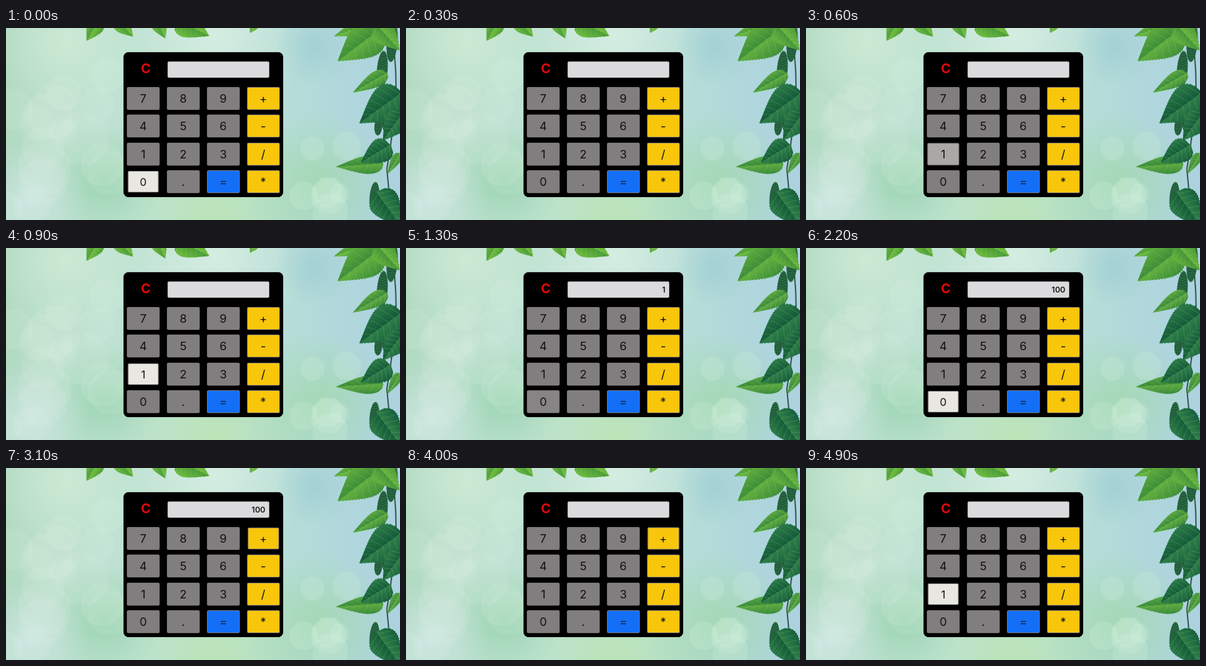
Write an HTML page with a canvas that moves like this. It is 600 by 293 pixels and loops after 5 s.

```html
<!DOCTYPE html>
<html lang="en">
<head>
<meta charset="utf-8">
<title>Calculator</title>
<style>
html, body { margin: 0; width: 100%; height: 100%; overflow: hidden; }
body { position: relative; font-family: Inter, Roboto, sans-serif; }
canvas { position: absolute; left: 0; top: 0; display: block; }
.calc { position: absolute; left: 179px; top: 37px; width: 243px; height: 221px; border-radius: 8px; background: #000; box-shadow: 0 0 1px #000; }
.clear { position: absolute; left: 20px; top: 12px; width: 28px; height: 26px; line-height: 26px; text-align: center; color: #e50909; font-size: 20px; font-weight: 700; }
.screen { position: absolute; left: 67px; top: 14px; width: 149px; height: 25px; padding-right: 6px; line-height: 25px; border-radius: 3px; background: #dbdbdd; box-shadow: inset 0 0 0 1px #b2b2b5; color: #151515; text-align: right; font-size: 12px; font-weight: 600; }
.key { position: absolute; box-sizing: border-box; width: 50px; height: 35px; line-height: 34px; border: 1px solid #767270; border-radius: 2px; text-align: center; font-size: 17.5px; color: #111; background: #817e7f; }
.op { background: #f8c60b; }
.eq { background: #146ff6; color: #10264c; }
</style>
</head>
<body>
<canvas id="scene" width="600" height="293"></canvas>
<div class="calc" id="calc">
  <div class="clear">C</div>
  <div class="screen" id="screen"></div>
</div>
<script>
const ctx = document.getElementById('scene').getContext('2d');
const clamp = x => Math.min(1, Math.max(0, x));
const mix = (a, b, k) => a + (b - a) * k;
const blend = (from, to, k) => `rgb(${from.map((v, i) => mix(v, to[i], k))})`;

let seed = 7;
function random(min, max) {
  seed = (seed * 16807) % 2147483647;
  return mix(min, max, seed / 2147483647);
}

function glow(x, y, r, rgb) {
  const g = ctx.createRadialGradient(x, y, 0, x, y, r);
  g.addColorStop(0, `rgba(${rgb},.8)`);
  g.addColorStop(0.5, `rgba(${rgb},.4)`);
  g.addColorStop(1, `rgba(${rgb},0)`);
  ctx.fillStyle = g;
  ctx.fillRect(0, 0, 600, 293);
}

function bokeh(x, y, r, alpha) {
  ctx.beginPath();
  for (let a = 0.4; a < 6.6; a += Math.PI / 4) {
    ctx.lineTo(x + r * Math.cos(a), y + r * Math.sin(a));
  }
  ctx.fillStyle = `rgba(228,246,236,${alpha})`;
  ctx.fill();
}

// Serrated leaf from base to tip; ratio is half width over length.
function leaf(x0, y0, x1, y1, ratio) {
  const len = Math.hypot(x1 - x0, y1 - y0);
  const half = t => len * ratio * Math.sin(Math.PI * Math.pow(t, 0.56));
  const shade = clamp((y0 + x0 / 3 - 170) / 100) * (ratio > 0.2 ? 1 : 0.3);
  const light = blend([112, 188, 62], [44, 124, 72], shade);
  const dark = blend([74, 156, 56], [20, 92, 58], shade);
  ctx.save();
  ctx.translate(x0, y0);
  ctx.rotate(Math.atan2(y1 - y0, x1 - x0));
  ctx.beginPath();
  const teeth = Math.round(len / 4);
  for (const side of [1, -1]) {
    for (let i = 0; i <= teeth; i++) {
      const t = side > 0 ? i / teeth : 1 - i / teeth;
      ctx.lineTo(len * t, side * half(t));
      ctx.lineTo(len * t + side, side * half(t) * 0.93);
    }
  }
  const g = ctx.createLinearGradient(0, -len * ratio, 0, len * ratio);
  [dark, light, dark, light].forEach((c, i) => g.addColorStop([0, 0.48, 0.52, 1][i], c));
  ctx.fillStyle = g;
  ctx.fill();
  ctx.beginPath();
  ctx.moveTo(0, 0);
  ctx.lineTo(len, 0);
  for (let t = 0.06; t < 0.8; t += 0.13) {
    for (const side of [-1, 1]) {
      ctx.moveTo(len * t, 0);
      ctx.lineTo(len * (t + 0.12), side * half(t + 0.12) * 0.85);
    }
  }
  ctx.strokeStyle = 'rgba(165,210,120,.35)';
  ctx.lineWidth = 0.6;
  ctx.stroke();
  ctx.restore();
}

function catkin(x, y, length) {
  const rx = 4 + length / 14;
  ctx.save();
  ctx.beginPath();
  ctx.ellipse(x, y, rx, length / 2, 0.08, 0, Math.PI * 2);
  ctx.fillStyle = '#1f5c3c';
  ctx.fill();
  ctx.clip();
  ctx.beginPath();
  for (let d = -length / 2; d < length / 2; d += 4) {
    ctx.moveTo(x - rx, y + d);
    ctx.lineTo(x, y + d + 3);
    ctx.lineTo(x + rx, y + d);
  }
  ctx.strokeStyle = 'rgba(100,155,85,.45)';
  ctx.lineWidth = 0.8;
  ctx.stroke();
  ctx.restore();
}

function drawScene() {
  const sky = ctx.createLinearGradient(0, 0, 600, 0);
  ['#b2dac2', '#bfe2d2', '#bce2d2', '#b4dcd8', '#acd2e0']
    .forEach((color, i) => sky.addColorStop(i / 4, color));
  ctx.fillStyle = sky;
  ctx.fillRect(0, 0, 600, 293);

  glow(90, 20, 110, '208,236,214');
  glow(320, 10, 140, '220,239,229');
  glow(470, 30, 60, '160,206,212');
  glow(150, 235, 90, '148,210,172');
  glow(320, 290, 140, '186,228,176');
  glow(475, 240, 110, '160,216,168');
  glow(35, 265, 90, '206,230,230');

  for (let i = 0; i < 16; i++) {
    bokeh(random(0, 170), random(60, 293), random(18, 45), 0.1);
    if (i < 7) bokeh(random(430, 540), random(165, 290), random(15, 30), 0.16);
  }

  // Foliage: hanging branch, then catkins behind the leaves.
  ctx.beginPath();
  ctx.moveTo(586, 0);
  ctx.bezierCurveTo(600, 80, 594, 130, 580, 215);
  ctx.lineTo(584, 257);
  ctx.strokeStyle = '#34584a';
  ctx.lineWidth = 2;
  ctx.stroke();
  [[588, 22, 60], [573, 64, 58], [580, 135, 48], [567, 150, 28], [561, 258, 46]]
    .forEach(c => catkin(...c));

  const slim = [[545, -4, 499, 13], [581, 68, 528, 99], [575, 207, 502, 212], [600, 190, 581, 223]];
  const broad = [
    [142, -12, 123, 20], [168, -14, 194, 13], [228, -16, 243, 16], [258, -14, 310, 12],
    [381, -9, 372, 8], [570, 2, 505, 51], [564, -6, 600, 34], [604, 98, 538, 146],
    [606, 128, 574, 172], [586, 178, 540, 206], [564, 250, 604, 304]
  ];
  slim.forEach(p => leaf(...p, 0.2));
  broad.forEach(p => leaf(...p, 0.36));
}

const keys = {};
['789+', '456-', '123/', '0.=*'].forEach((row, r) => {
  [...row].forEach((label, c) => {
    const el = document.createElement('div');
    el.className = 'key' + (c === 3 ? ' op' : label === '=' ? ' eq' : '');
    el.textContent = label;
    el.style.left = 5 + c * 60.9 + 'px';
    el.style.top = 52.7 + r * 42.4 + 'px';
    document.getElementById('calc').append(el);
    keys[label] = el;
  });
});

// Pointer visits per key: [enter, leave] in ms
const visits = {
  '0': [[-500, 100], [1270, 2500]],
  '1': [[400, 1000], [4300, 5000]],
  '+': [[2700, 3900]]
};
const presses = [[1000, '1'], [1800, '0'], [2100, '0']];
const clearAt = 3400;
const screenEl = document.getElementById('screen');

function hover(label, t) {
  return Math.max(...visits[label].map(([enter, leave]) =>
    clamp((t - enter) / 500) * (1 - clamp((t - leave) / 180))));
}

function render(now) {
  const t = Math.floor(now % 5000 / 100) * 100;
  for (const label in visits) {
    const k = hover(label, t);
    const style = keys[label].style;
    style.transform = `scale(${1 - 0.06 * k})`;
    if (label !== '+') style.background = blend([129, 126, 127], [232, 231, 226], k);
  }
  const typed = presses.filter(p => p[0] <= t && t < clearAt);
  screenEl.textContent = typed.map(p => p[1]).join('');
}

drawScene();
const start = performance.now();
function tick() {
  render(performance.now() - start);
  requestAnimationFrame(tick);
}
tick();
</script>
</body>
</html>
```
